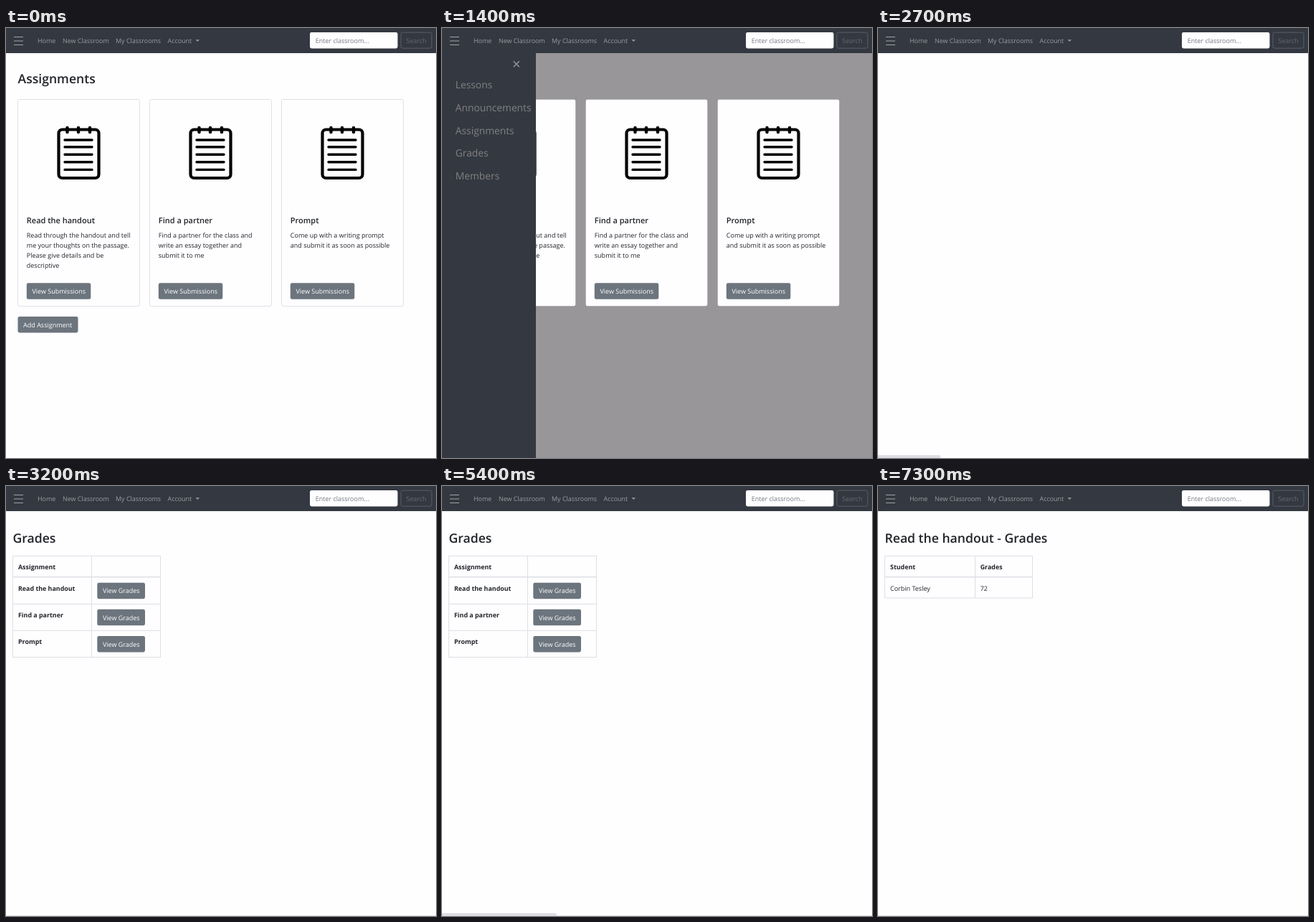
Write an HTML page that moves like this. It is 600 by 599 pixels and loops after 8 s.

```html
<!DOCTYPE html>
<html lang="en">
<head>
<meta charset="utf-8">
<title>Classroom grades</title>
<style>
  html, body { margin: 0; width: 100%; height: 100%; overflow: hidden; background: #fefdff; }
  svg { display: block; width: 100%; height: 100%; }
  text { font: 9px "Open Sans", "Noto Sans", sans-serif; fill: #212529; text-rendering: geometricPrecision; white-space: pre; }
  .heading { font-size: 17.6px; font-weight: 600; }
  .title { font-size: 11px; font-weight: 600; }
  .bold { font-size: 8.9px; font-weight: 700; }
  .nav { font-size: 8.95px; fill: #9a9ca0; }
  .hint { fill: #737a82; }
  .dim { fill: #636a72; }
  .light { fill: #fefdff; }
  .side { font-size: 13.8px; fill: #818181; }
</style>
</head>
<body>
<svg id="stage" viewBox="0 0 600 599"></svg>
<script>
const LOOP = 8000, STEP = 100, SIDEBAR = 148;
const DARK = '#343841', WHITE = '#fefdff', GREY = '#989698';
const stage = document.getElementById('stage');

const text = (x, y, str, cls = '', id = '') =>
  `<text x="${x}" y="${y}" class="${cls}" id="${id}">${str}</text>`;
const rect = (x, y, w, h, fill, extra = '') =>
  `<rect x="${x}" y="${y}" width="${w}" height="${h}" fill="${fill}" ${extra}/>`;
const path = (d, stroke, width, extra = '') =>
  `<path d="${d}" fill="none" stroke="${stroke}" stroke-width="${width}" ${extra}/>`;
const group = (id, content, extra = '') => `<g id="${id}" ${extra}>${content}</g>`;

const button = (x, y, w, label, id = '') =>
  rect(x, y, w, 22.5, '#6c757d', `rx="2.4" id="${id}"`) + text(x + 7.6, y + 14.7, label, 'light');

function notepad(x) {
  const lines = [156, 165.7, 176.2, 186.8, 197.4].map(y => `M${x + 10.5} ${y}h38`).join('');
  const rings = [14, 29.5, 45.5].map(dx => `M${x + dx} 139v6`).join('');
  return rect(x + 2, 141.5, 56, 67.5, 'none', 'rx="5" stroke="#000" stroke-width="4.2"') +
    path(lines, '#000', 3.4, 'stroke-linecap="round"') +
    path(rings, '#000', 4.4, 'stroke-linecap="round"');
}

const card = (x, title, lines) =>
  rect(x, 99.5, 170, 288, WHITE, 'rx="2.4" stroke="#000" stroke-opacity=".11"') +
  notepad(x + 55) +
  text(x + 12.3, 271.6, title, 'title') +
  lines.map((line, i) => text(x + 12.3, 291.9 + 14.1 * i, line)).join('') +
  button(x + 12.3, 355.3, 89.5, 'View Submissions');

// Bordered table with a double-width rule under its header row
const grid = (column, rows) => {
  const bottom = rows[rows.length - 1];
  return path(rows.map(y => `M9 ${y}H216`).join('') +
    [9.5, column, 215.5].map(x => `M${x} 97V${bottom}`).join(''), '#dee0e5', 1) +
    path('M9 126.8H216', '#dee0e5', 1.6);
};

const navbar = rect(0, 0, 600, 35, DARK) +
  path('M11 12.5H24M11 18H24M11 23.5H24', '#a0a2a6', 1.2) +
  text(44, 21, 'Home', 'nav') + text(79, 21, 'New Classroom', 'nav') +
  text(153, 21, 'My Classrooms', 'nav') + text(225.5, 21, 'Account', 'nav') +
  '<path d="M264.5 16.2h5.6l-2.8 2.8z" fill="#9a9ca0"/>' +
  rect(424, 6, 122.5, 22.5, WHITE, 'rx="2.4"') + text(431.7, 21.2, 'Enter classroom...', 'hint') +
  rect(551, 6.2, 43, 22, 'none', 'rx="2.4" stroke="#575e66"') + text(558.3, 21, 'Search', 'dim');

const assignments = text(16.5, 77, 'Assignments', 'heading') +
  card(16.5, 'Read the handout', ['Read through the handout and tell',
    'me your thoughts on the passage.', 'Please give details and be', 'descriptive']) +
  card(200.5, 'Find a partner', ['Find a partner for the class and',
    'write an essay together and', 'submit it to me']) +
  card(384.5, 'Prompt', ['Come up with a writing prompt', 'and submit it as soon as possible']) +
  button(16.5, 402, 84, 'Add Assignment');

const grades = text(9.5, 79.3, 'Grades', 'heading') +
  grid(119.5, [97.5, 164.5, 201.5, 238.5]) +
  text(17, 115.8, 'Assignment', 'bold') +
  ['Read the handout', 'Find a partner', 'Prompt'].map((name, i) =>
    text(17, 145.5 + 37.1 * i, name, 'bold') +
    button(127.3, 134.7 + 37.1 * i, 66.7, 'View Grades', 'view' + i)).join('');

const result = text(9.5, 79.3, 'Read the handout - Grades', 'heading') +
  grid(135.5, [97.5, 156]) +
  text(17, 115.8, 'Student', 'bold') + text(142.7, 115.8, 'Grades', 'bold') +
  text(17, 145.5, 'Corbin Tesley') + text(142.7, 145.5, '72');

const sidebar = rect(0, 35, SIDEBAR, 564, DARK) +
  group('close', path('M-4 46.3l8 8M4 46.3l-8 8', '#999ba0', 1.3)) +
  ['Lessons', 'Announcements', 'Assignments', 'Grades', 'Members'].map((name, i) =>
    text(18.8, 84.4 + 31.6 * i, name, 'side', 'side' + i)).join('');

stage.innerHTML =
  '<clipPath id="clip"><rect id="opening" y="35" height="564"/></clipPath>' +
  rect(0, 0, 600, 599, WHITE, 'id="page"') +
  group('assignments', assignments) + group('grades', grades) + group('result', result) +
  group('sidebar', sidebar, 'clip-path="url(#clip)"') +
  path('M0 598.5H600', '#e3e3e7', 1, 'id="edge"') +
  '<path id="status"/>' + navbar;

const $ = id => document.getElementById(id);
const clamp = v => Math.min(1, Math.max(0, v));
const within = (t, from, to) => t >= from && t < to;
const show = (id, on) => $(id).setAttribute('display', on ? 'inline' : 'none');
const mix = (a, b, p) => `rgb(${a.map((v, i) => Math.round(v + (b[i] - v) * p))})`;

// The CSS "ease" curve, cubic-bezier(.25, .1, .25, 1)
function ease(p) {
  const bezier = (a, b, s) => 3 * a * s * (1 - s) ** 2 + 3 * b * s * s * (1 - s) + s ** 3;
  let low = 0, high = 1;
  for (let i = 0; i < 20; i++) {
    const mid = (low + high) / 2;
    if (bezier(.25, .25, mid) < p) low = mid; else high = mid;
  }
  return bezier(.1, 1, low);
}

function hoverAmount(t) {
  if (within(t, 4500, 5200)) return clamp((t - 4480) / 120);
  if (within(t, 5200, 6500)) return clamp((5300 - t) / 150);
  return t >= 6500 ? clamp((t - 6365) / 150) : 0;
}

function draw(t) {
  const open = within(t, 1100, 2700);
  show('assignments', t < 2700);
  show('grades', within(t, 2800, 6800));
  show('result', t >= 6900);
  show('sidebar', open);
  show('edge', t >= 2800);
  $('page').setAttribute('fill', open ? GREY : WHITE);

  const width = SIDEBAR * ease(clamp((t - 1100) / 500));
  $('opening').setAttribute('width', width);
  $('close').setAttribute('transform', `translate(${width - 27.2} 0)`);
  $('side3').style.fill = mix([129, 129, 129], [254, 253, 255], clamp((t - 1600) / 300));
  $('view0').setAttribute('fill', mix([108, 117, 125], [90, 98, 104], hoverAmount(t)));

  const first = within(t, 1900, 3000);
  const end = first ? 87 : 160;
  show('status', first || within(t, 4800, 5600) || within(t, 6700, 7300));
  $('status').setAttribute('d', `M0 595H${end - 2.5}q2.5 0 2.5 2.5V599H0z`);
  $('status').setAttribute('fill', open ? '#eef0f4' : '#dcdee4');
}

function frame() {
  draw(Math.floor(performance.now() % LOOP / STEP) * STEP);
  requestAnimationFrame(frame);
}
frame();
</script>
</body>
</html>
```
